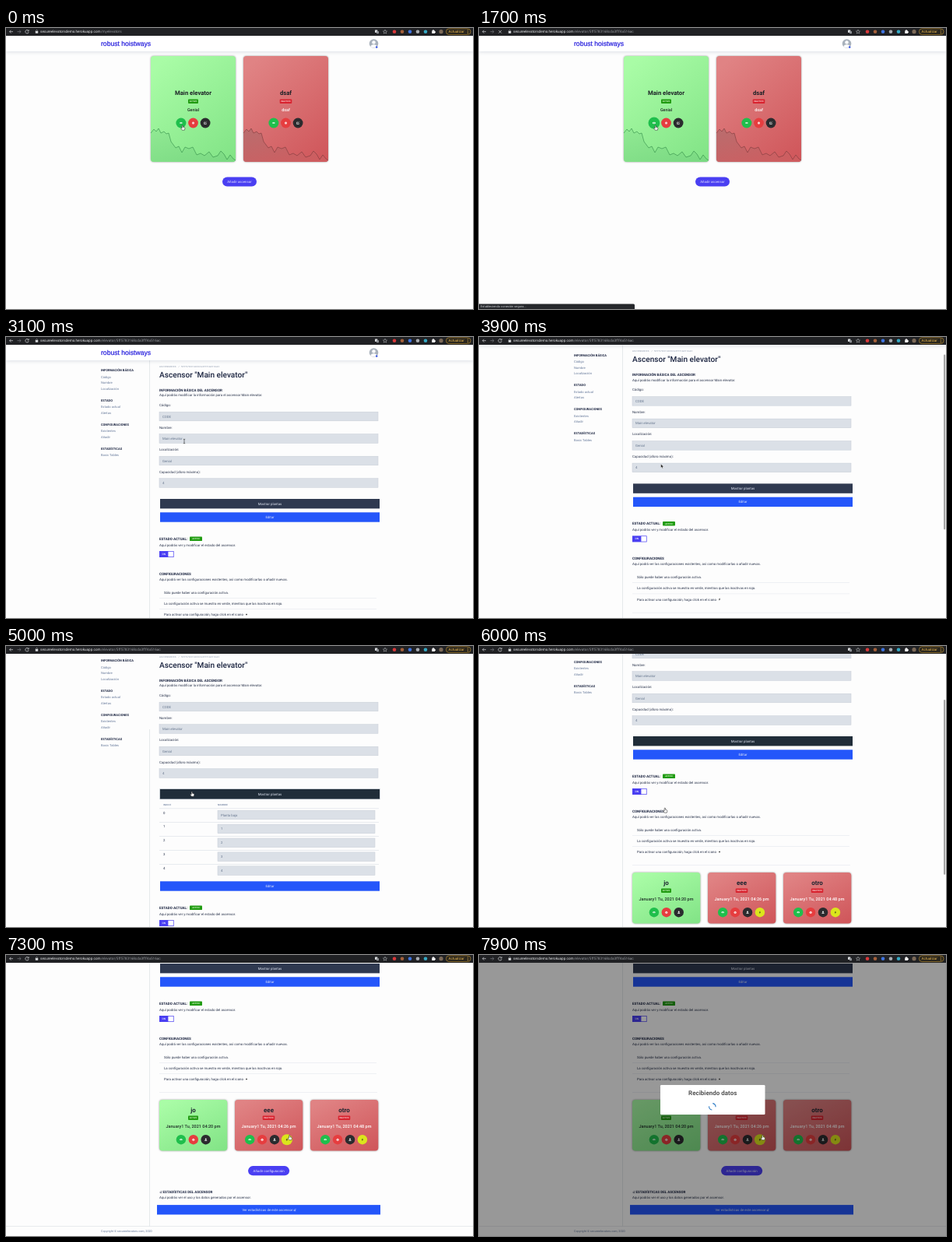
These frames come from a looping animation (600x361 px, 8 s). An HTML page:

```html
<!DOCTYPE html>
<html lang="es">
<head>
<meta charset="utf-8">
<title>Ascensores</title>
<style>
  html, body { margin: 0; width: 100%; height: 100%; overflow: hidden; background: #fdfdfd; }
  svg { display: block; width: 100vw; height: 100vh; }
  text { font-family: Roboto, sans-serif; text-rendering: geometricPrecision; white-space: pre; }
  .card { filter: drop-shadow(0 .8px 1.2px rgba(0, 0, 0, .4)); }
</style>
</head>
<body>
<svg id="stage" viewBox="0 0 600 361" xmlns="http://www.w3.org/2000/svg"></svg>
<script>
const LOOP = 8000;
const INK = '#1b2440', BODY = '#28324a', MUTED = '#66799a', BLUE = '#2456fa', VIOLET = '#4a3ff2';
const GREEN = '#1fbf4c', RED = '#e63d3f', DARK = '#2b2b2e', YELLOW = '#dbe51c';

const rect = (x, y, w, h, fill, more = '') =>
  `<rect x="${x}" y="${y}" width="${w}" height="${h}" fill="${fill}" ${more}/>`;
const circle = (x, y, r, fill, more = '') =>
  `<circle cx="${x}" cy="${y}" r="${r}" fill="${fill}" ${more}/>`;
const line = (x1, x2, y, color = '#dfe3ea') => rect(x1, y, x2 - x1, .5, color);
const path = (d, stroke, width = .7, fill = 'none', more = '') =>
  `<path d="${d}" stroke="${stroke}" stroke-width="${width}" fill="${fill}" ${more}/>`;
const group = (id, body, more = '') => `<g id="${id}" ${more}>${body}</g>`;
const at = (x, y, body) => `<g transform="translate(${x} ${y})">${body}</g>`;

// y is the middle of the capitals
const text = (s, x, y, size = 4.35, fill = BODY, weight = 400, more = '') =>
  `<text x="${x}" y="${y + size * .355}" font-size="${size}" fill="${fill}" font-weight="${weight}" ${more}>${s}</text>`;
const mid = (s, x, y, size, fill, weight, more = '') =>
  text(s, x, y, size, fill, weight, 'text-anchor="middle" ' + more);

const BOLT = 'M.5-2L-1.1.4H0L-.5 2L1.1-.5H0Z';
const icons = {
  eye: path('M-2 0Q0-2.2 2 0Q0 2.2-2 0Z', 'none', 0, '#fff') + circle(0, 0, .6, GREEN),
  stop: circle(0, 0, 1.5, '#fff') + path('M-.6-.6L.6.6M.6-.6L-.6.6', RED, .5),
  edit: path('M1.2.2V1.5H-1.5V-1H.2M-.4.5L1.6-1.5', '#fff', .6),
  user: path('M-1.7 1.5Q-1.6 .2 0 .2Q1.6 .2 1.7 1.5Z', 'none', 0, '#fff') + circle(0, -.8, .9, '#fff'),
  bolt: path(BOLT, 'none', 0, '#222')
};
const button = (x, y, r, fill, icon, id = '') =>
  at(x, y, `<g ${id && `id="${id}"`}>${circle(0, 0, r, fill)}${icons[icon]}</g>`);
const badge = (x, y, active, w = active ? 13 : 15.5, h = 5.4) =>
  rect(x - w / 2, y - h / 2, w, h, active ? '#219c12' : '#d8232f', 'rx=".9"') +
  mid(active ? 'ACTIVO' : 'INACTIVO', x, y, 2.7, active ? '#d9f7cf' : '#ffdcdc', 700);
const pill = (x, y, w, label) =>
  rect(x - w / 2, y - 6.1, w, 12.2, VIOLET, 'rx="6.1"') + mid(label, x, y, 4.35, '#e9e8ff', 400);
const bar = (x, y, w, label, fill, more = '') =>
  rect(x, y - 6.2, w, 12.4, fill, more) + mid(label, x + w / 2, y, 4.35, '#e2e7f4', 400);
const input = (x, y, w, value) =>
  rect(x, y - 5.8, w, 11.6, '#dbe0e7', 'stroke="#c5ccd6" stroke-width=".5"') + text(value, x + 4, y, 4.3, '#66768e');

const siteHeader = () =>
  rect(0, 8, 600, 22, '#fff', 'style="filter:drop-shadow(0 1px 2.5px rgba(40,60,100,.16))"') +
  text('robust hoistways', 122, 20, 8.6, '#2018dc', 400,
    'style="font-family:\'Liberation Sans\',sans-serif" stroke="#2018dc" stroke-width=".2"') +
  circle(472.5, 20, 5.8, '#a9b2bc') + circle(472.5, 18.4, 2.2, '#fff') +
  path('M468.4 24Q469 21.2 472.5 21.2Q476 21.2 476.6 24Q472.5 27.2 468.4 24Z', 'none', 0, '#fff') +
  circle(476.2, 24.6, 1.3, '#3d5be0');

function toolbar() {
  const pale = '#d5d7da';
  const marks = [[499, '#d8383a'], [509, '#a4603a'], [519, '#3f74e0'], [529, '#a9adb3'], [539, '#35a9c4']];
  return rect(0, 0, 600, 10, '#202124') +
    path('M9 4.7H4.6M6.4 2.8L4.5 4.7L6.4 6.6', pale) +
    path('M14.5 4.7H19M17.2 2.8L19.1 4.7L17.2 6.6', '#7c7f84') +
    group('reload', path('M28.7 3.3A2.2 2.2 0 1 0 29.2 5.2M29.2 2.3V4H27.4', pale)) +
    group('cancel', path('M25.3 3L28.9 6.6M28.9 3L25.3 6.6', pale)) +
    rect(37.8, 4.1, 3.4, 2.7, pale, 'rx=".4"') + path('M38.5 4.2V3.2Q39.5 1.6 40.5 3.2V4.2', pale, .5) +
    `<text x="44" y="6.2" font-size="4.63" fill="#eceef0">secureelevatorsdemo.herokuapp.com<tspan id="route" fill="#96999e"></tspan></text>` +
    rect(474, 2.4, 3.3, 3.6, pale, 'rx=".4"') + rect(476, 4, 3, 3.3, '#8d9095', 'rx=".4"') +
    path('M487 2.2L487.8 4L489.6 4.1L488.2 5.3L488.7 7.1L487 6.1L485.3 7.1L485.8 5.3L484.4 4.1L486.2 4Z', pale, .45) +
    marks.map(([x, c]) => circle(x, 4.7, 2.3, c)).join('') +
    rect(547.2, 3.3, 3.8, 3.8, '#f1f1f1', 'rx=".5"') + circle(549, 3.2, 1, '#f1f1f1') + circle(551, 5.2, 1, '#f1f1f1') +
    circle(559, 4.7, 2.6, '#7d6a58') +
    rect(565.4, .8, 31.6, 7.8, '#2a261d', 'rx="3.9" stroke="#c99a35" stroke-width=".6"') +
    text('Actualizar', 568.6, 4.7, 4.5, '#f3bd4f') +
    [2.8, 4.7, 6.6].map(y => circle(593.3, y, .55, '#f3bd4f')).join('');
}

function homeCard(x, name, place, active) {
  const c = x + 54.5, tone = active ? 'green' : 'red';
  const ridge = [0, 99, 4, 94, 7, 97, 10, 93, 13, 99, 17, 97, 20, 100, 23, 99, 26, 110, 29, 114, 32, 118, 36, 116,
    40, 124, 44, 117, 49, 119, 54, 117, 59, 127, 64, 125, 69, 128, 75, 123, 80, 130, 86, 128, 90, 122, 94, 126,
    98, 133, 102, 127, 106, 132, 109, 134];
  return group(tone + 'Home', rect(x, 36, 109, 136, `url(#${tone})`, 'rx="4" class="card"') +
    at(x, 36, path(`M${ridge}V132Q109 136 105 136H4Q0 136 0 132Z`, 'none', 0, `url(#${tone}Hill)`) +
      path(`M${ridge}`, active ? '#2f8a45' : '#7c3a3c', .6)) +
    mid(name, c, 83.4, 7.7, '#1c2126', 700) + badge(c, 94.3, active) +
    mid(place, c, 105, 5.4, active ? '#1f2a26' : '#fff', 500) +
    button(c - 15.6, 122, 6.5, GREEN, 'eye', active ? 'openBtn' : '') +
    button(c, 122, 6.4, RED, 'stop') + button(c + 15.6, 122, 6.4, DARK, 'edit'));
}

const home = () => rect(0, 0, 600, 361, '#fdfdfd') + siteHeader() +
  homeCard(186, 'Main elevator', 'Genial', true) + homeCard(305, 'dsaf', 'dsaf', false) +
  pill(300, 197.5, 44, 'Añadir ascensor');

function sidebar() {
  const menu = [
    [43, 'INFORMACIÓN BÁSICA', 'Código', 'Nombre', 'Localización'],
    [81.5, 'ESTADO', 'Estado actual', 'Alertas'],
    [112.5, 'CONFIGURACIONES', 'Existentes', 'Añadir'],
    [143.5, 'ESTADÍSTICAS', 'Basic Tables']
  ];
  return menu.map(([y, head, ...items]) => text(head, 122, y, 3.98, INK, 700) +
    items.map((s, i) => text(s, 122, y + 8.4 + i * 7.6, 4.1, MUTED)).join('')).join('');
}

function floors() {
  return text('INDICE', 202, 227.5, 2.9, MUTED, 500, 'letter-spacing=".2"') +
    text('NOMBRE', 272, 227.5, 2.9, MUTED, 500, 'letter-spacing=".2"') +
    ['Planta baja', 1, 2, 3, 4].map((name, i) => {
      const y = 241 + i * 17.9;
      return line(197, 479, y - 8.4, '#d3d8e0') + text(i, 202, y - 3, 4.35) + input(272, y, 202, name);
    }).join('');
}

function configCard(x, name, time, active) {
  const c = x + 43.5, list = [[GREEN, 'eye'], [RED, 'stop'], [DARK, 'user']];
  if (!active) list.push([YELLOW, 'bolt']);
  const first = active ? c - 15.6 : c - 24.3;
  return rect(x, 383, 87.3, 65.5, `url(#${active ? 'green' : 'red'})`, 'rx="4" class="card"') +
    mid(name, c, 395.7, 8, '#1d2530', 700) + badge(c, 406.2, active) +
    mid(`January1 Tu, 2021 ${time} pm`, c, 417, 5.5, active ? '#1d2b26' : '#fff', 500) +
    list.map(([fill, icon], i) => button(first + i * 15.9, 434.2, 6.2, fill, icon,
      name === 'eee' && icon === 'bolt' ? 'boltBtn' : '')).join('');
}

function lower() {
  const notes = ['Sólo puede haber una configuración activa.',
    'La configuración activa se muestra en verde, mientras que las inactivas en rojo.',
    'Para activar una configuración, haga click en el icono'];
  return bar(198, 231.5, 282, 'Editar', BLUE) +
    text('ESTADO ACTUAL:', 197, 259, 4.5, INK, 700) + badge(244, 259.3, true, 16, 5.6) +
    text('Aquí podrás ver y modificar el estado del ascensor.', 197, 267) +
    rect(197, 275, 18.6, 8, VIOLET) + rect(208.4, 275.7, 6.5, 6.6, '#fff') + mid('ON', 202.7, 279, 3.1, '#fff', 500) +
    text('CONFIGURACIONES', 197, 304, 4.5, INK, 700) +
    text('Aquí podrá ver las configuraciones existentes, así como modificarlas o añadir nuevas.', 197, 311.2) +
    notes.map((s, i) => text(s, 203, 328 + i * 14.3)).join('') +
    line(197, 476, 335) + line(197, 476, 349.3) + line(197, 477, 373.5) +
    at(309, 356.6, icons.bolt) +
    configCard(197, 'jo', '04:20', true) + configCard(294, 'eee', '04:26') + configCard(391, 'otro', '04:48') +
    pill(337.6, 474.2, 53, 'Añadir configuración') +
    at(199, 501.3, path('M-1.3 1.2H1.3M-1.2 .4L-.2-.6L.4 0L1.4-1.3', INK, .6)) +
    text('ESTADÍSTICAS DEL ASCENSOR', 201.4, 501.2, 4.5, INK, 700) +
    text('Aquí podrás ver el uso y los datos generados por el ascensor.', 197, 508.2) +
    bar(194, 524.3, 287, 'Ver estadísticas de este ascensor   ', BLUE) +
    at(371, 524.4, path('M-1.4 1.2H1.3M-1.2 .4L-.2-.6L.4 0L1.4-1.3', '#fff', .6)) +
    line(0, 600, 545.5, '#d3d8df') +
    text('Copyright © secureelevators.com, 2020', 122, 551.6, 3.75, MUTED);
}

function detail() {
  const fields = [['Código:', 'CODE'], ['Nombre:', 'Main elevator'], ['Localización:', 'Genial'],
    ['Capacidad (aforo máximo):', '4']];
  return group('rail', rect(184, 30, .6, 515.5, '#d5dde0')) + siteHeader() + sidebar() +
    text('ASCENSORES', 197, 38, 2.85, '#7f8ca3', 400, 'letter-spacing=".42"') +
    text('/', 221.5, 38, 2.85, '#7f8ca3') +
    text('5FF5783168CDA3FFF4A516AC', 225, 38, 2.85, '#7f8ca3', 400, 'letter-spacing=".42"') +
    text('Ascensor "Main elevator"', 197, 48.2, 10.1, INK, 500) +
    text('INFORMACIÓN BÁSICA DEL ASCENSOR', 197, 68, 4.5, INK, 700) +
    text('Aquí podrás modificar la información para el ascensor Main elevator.', 197, 74.6) +
    fields.map(([label, value], i) => text(label, 197, 87.5 + i * 28.5) + input(197, 102 + i * 28.5, 281, value)).join('') +
    rect(197.4, 207.4, 283.2, 13.6, '#aeb6c1', 'id="ring"') + bar(198, 214.2, 282, 'Mostrar plantas', '#2f3950', 'id="toggle"') +
    `<g clip-path="url(#fold)">${floors()}</g>` + group('lower', lower());
}

const modal = () => rect(0, 10, 600, 351, '#000', 'opacity=".4"') + group('popup',
  rect(233, 167, 134.5, 38, '#fff', 'rx="1.3"') + mid('Recibiendo datos', 300.2, 177, 8, '#545454', 600) +
  group('spin', path('M-3-3A4.2 4.2 0 0 1 3-3M3 3A4.2 4.2 0 0 1-3 3', '#2778c4', 1.1)));

const pointers =
  group('hand', path('M-.8.2V-2.6Q-.1-3.4.5-2.6V-.8L2.4-.2Q3 .2 2.8 1.4L2.3 3.2H-.7L-2.3.9Q-2-.1-.8.8Z', '#111', .5, '#fff')) +
  group('beam', path('M-1.2-2.8Q0-2.8 0-2Q0-2.8 1.2-2.8M0-2V2M-1.2 2.8Q0 2.8 0 2Q0 2.8 1.2 2.8', '#222', .6)) +
  group('arrow', path('M-1-2.5V2.3L.1 1.3L.9 3L1.7 2.6L1 1H2.5Z', '#fff', .4, '#111'));

const fade = (id, a, b) => `<linearGradient id="${id}" x1=".2" y1="0" x2=".9" y2="1">
  <stop stop-color="${a}"/><stop offset="1" stop-color="${b}"/></linearGradient>`;

document.getElementById('stage').innerHTML =
  `<defs>${fade('green', '#a9fca6', '#83e487')}${fade('red', '#e08384', '#d0575b')}
  ${fade('greenHill', '#8fe892', '#7ad982')}${fade('redHill', '#bb6c6d', '#cf5c5f')}
  <clipPath id="fold"><rect id="foldBox" x="190" y="221" width="300" height="0"/></clipPath></defs>` +
  rect(0, 0, 600, 361, '#fdfdfd') + group('home', home()) + group('detail', detail()) +
  rect(597, 10, 2.2, 225, '#8d8d8d', 'rx="1.1" id="thumb"') + group('modal', modal()) +
  group('status', path('M0 354.5H198.5Q200 354.5 200 356V361H0Z', 'none', 0, '#25272b') +
    text('Estableciendo conexión segura...', 2, 358, 4, '#c9ccd0')) +
  toolbar() + group('cursor', pointers);

const el = id => document.getElementById(id);
const set = (id, name, value) => el(id).setAttribute(name, value);
const show = (id, on) => set(id, 'display', on ? 'inline' : 'none');

// Eased value through [time, value] stops
function track(t, stops) {
  if (t <= stops[0][0]) return stops[0][1];
  for (let i = 1; i < stops.length; i++) {
    const [t0, a] = stops[i - 1], [t1, b] = stops[i];
    if (t < t1) {
      const p = (t - t0) / (t1 - t0);
      return a + (b - a) * p * p * (3 - 2 * p);
    }
  }
  return stops[stops.length - 1][1];
}

function draw(t) {
  const onHome = t < 2100, loading = t >= 600 && t < 2300;
  show('home', onHome);
  show('detail', !onHome);
  show('status', loading);
  show('cancel', loading);
  show('reload', !loading);
  el('route').textContent = t < 600 ? '/myelevators' : '/elevator/5ff5783168cda3fff4a516ac';
  set('openBtn', 'transform', `scale(${track(t, [[100, 1], [300, 1.14]])})`);

  const scroll = track(t, [[3500, 0], [4050, 24], [5500, 24], [6000, 92], [6150, 92], [6700, 197]]);
  const open = 101 * track(t, [[4450, 0], [4800, 1], [5250, 1], [5550, 0]]);
  set('detail', 'transform', `translate(0 ${-scroll})`);
  set('lower', 'transform', `translate(0 ${open})`);
  set('rail', 'transform', `translate(0 ${open})`);
  set('foldBox', 'height', open);
  show('ring', t >= 4450 && t < 5600);
  set('toggle', 'fill', t >= 4150 && t < 6300 ? '#202d39' : '#2f3950');

  const doc = 548 + open;
  set('thumb', 'height', 351 * 351 / doc);
  set('thumb', 'y', 10 + scroll * 351 / doc);
  set('thumb', 'opacity', track(t, [[3450, 0], [3550, .8], [4250, .8], [4400, 0], [5450, 0], [5550, .8], [6800, .8], [7050, 0]]));

  const x = track(t, [[2400, 227], [2900, 229], [3600, 229], [4150, 239], [6400, 239], [7100, 364.5]]);
  const y = track(t, [[2400, 128], [2900, 134], [3600, 134], [4150, 190], [5400, 190], [5850, 211], [6400, 211], [7100, 234.5]]);
  const kind = t < 2100 ? 'hand' : t < 2700 ? 'arrow' : t < 3700 ? 'beam' : t < 4100 ? 'arrow' : t < 6400 ? 'hand' : t < 7050 ? 'arrow' : 'hand';
  set('cursor', 'transform', `translate(${x} ${y})`);
  ['hand', 'beam', 'arrow'].forEach(k => show(k, k === kind));
  set('boltBtn', 'transform', `scale(${track(t, [[7000, 1], [7200, 1.14]])})`);

  show('modal', t >= 7500);
  set('modal', 'opacity', track(t, [[7500, 0], [7650, 1]]));
  const s = track(t, [[7500, .7], [7635, 1.05], [7740, .95], [7800, 1]]);
  set('popup', 'transform', `translate(300.2 186) scale(${s}) translate(-300.2 -186)`);
  set('spin', 'transform', `translate(299.8 194.8) rotate(${(t - 7500) * .24 - 45})`);
}

let start;
function tick(now) {
  start ??= now;
  draw((now - start) % LOOP);
  requestAnimationFrame(tick);
}
draw(0);
requestAnimationFrame(tick);
</script>
</body>
</html>
```
